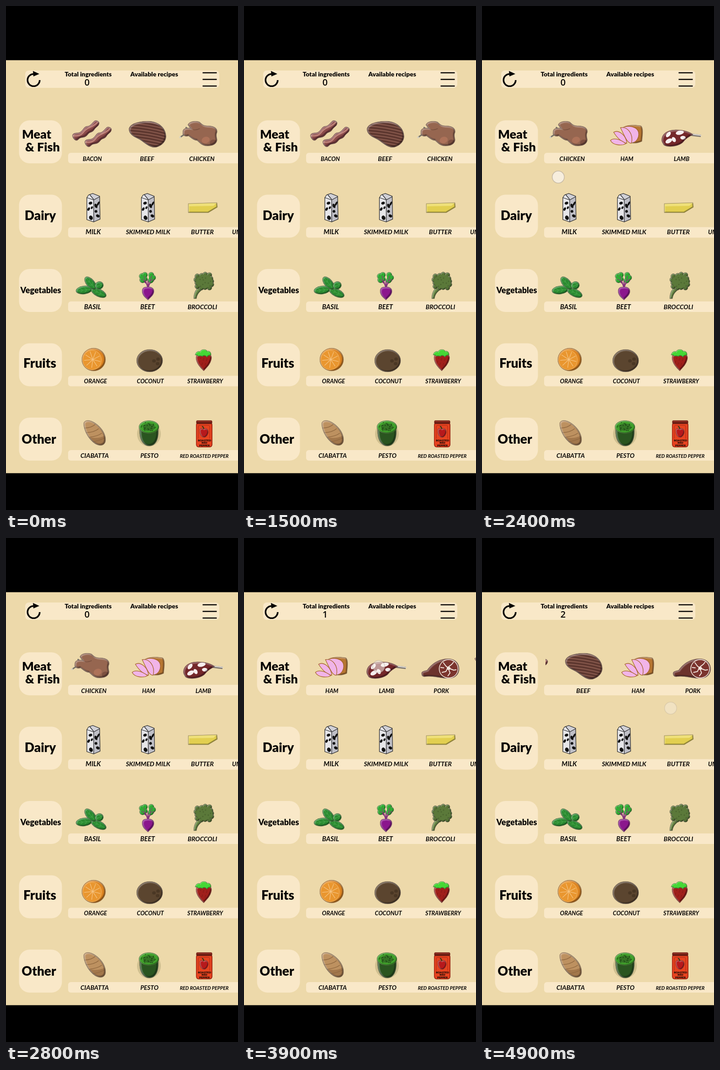
An HTML page with a canvas that plays this animation: 508x1102 px, repeating every 5000 ms.

```html
<!DOCTYPE html>
<html lang="en">
<head>
<meta charset="utf-8">
<title>Pick ingredients</title>
<style>
html, body { margin: 0; width: 100%; height: 100%; overflow: hidden; background: #000; }
canvas { display: block; width: 508px; height: 1102px; }
</style>
</head>
<body>
<canvas id="stage" width="508" height="1102"></canvas>
<script>
const c = document.getElementById('stage').getContext('2d');
const LOOP = 5000, STEP = 100;
const BG = '#edd9aa', PANEL = '#f9e8c8';

// ---------- helpers ----------
function fill(d, color) {
  c.fillStyle = color;
  c.fill(new Path2D(d));
}
function line(d, color, w = 1) {
  c.strokeStyle = color;
  c.lineWidth = w;
  c.stroke(new Path2D(d));
}
function oval(x, y, rx, ry = rx, rot = 0) {
  const p = new Path2D();
  p.ellipse(x, y, rx, ry, rot, 0, Math.PI * 2);
  return p;
}
function dot(color, ...args) {
  c.fillStyle = color;
  c.fill(oval(...args));
}
function box(x, y, w, h, r, color) {
  c.fillStyle = color;
  c.beginPath();
  c.roundRect(x, y, w, h, r);
  c.fill();
}
function inside(p, draw) {
  c.save();
  c.clip(p);
  draw();
  c.restore();
}
// Raised look: lit upper left rim, shaded lower right rim
function raise(shape, color, rim = 1, detail) {
  const p = typeof shape === 'string' ? new Path2D(shape) : shape;
  c.fillStyle = color;
  c.fill(p);
  inside(p, () => {
    if (detail) detail();
    for (const [shift, tint] of [[-1, 'rgba(0,0,0,.22)'], [1, 'rgba(255,255,255,.17)']]) {
      c.save();
      c.translate(shift * rim, shift * rim);
      c.strokeStyle = tint;
      for (const w of [2, 4.5]) { c.lineWidth = w * rim; c.stroke(p); }
      c.restore();
    }
  });
  c.strokeStyle = 'rgba(40,15,5,.3)';
  c.lineWidth = 0.8;
  c.stroke(p);
}
function text(s, x, y, font, align = 'center') {
  c.font = font;
  c.textAlign = align;
  c.fillStyle = '#080604';
  c.fillText(s, x, y);
}
const heavy = size => `900 ${size}px Lato, sans-serif`;
const hand = size => `italic 700 ${size}px Lato, sans-serif`;

// Linear keys: [time, ...values]; null outside their span
function track(keys, t) {
  for (let i = 0; i < keys.length - 1; i++) {
    const a = keys[i], b = keys[i + 1];
    if (t >= a[0] && t <= b[0]) {
      const k = (t - a[0]) / (b[0] - a[0]);
      return a.slice(1).map((v, j) => v + (b[j + 1] - v) * k);
    }
  }
  return null;
}

// ---------- meat & fish ----------
function bacon() {
  const strip = 'M146 281C150 276 156 279 162 276C169 272 170 264 177 263C185 263 189 255 194 251C199 249 205 253 204 257C203 263 196 265 193 271C189 277 184 275 180 280C175 287 171 287 165 288C159 289 158 295 153 294C148 292 144 285 146 281Z';
  for (const [dx, dy] of [[0, 0], [27, 14]]) {
    c.save();
    c.translate(dx, dy);
    raise(strip, '#8a4a4a', 1, () => {
      line('M146 284C158 284 164 284 171 274S188 268 203 252', '#bf847b', 3);
      line('M150 292C160 285 168 287 176 279S190 270 203 260', '#6f3739', 2);
    });
    c.restore();
  }
}
function beef() {
  raise('M269 268C272 257 290 252 312 252C336 253 350 268 350 286C349 301 333 310 322 309C308 306 300 295 287 289C277 285 268 278 269 268Z', '#5d372f', 1.2, () => {
    for (let i = 0; i < 11; i++) {
      const y = 236 + i * 6.5;
      line(`M264 ${y}Q310 ${y + 2} 354 ${y + 15}`, '#85574b', 2.6);
    }
  });
}
function chicken() {
  line('M381 287L390 281M393 265L399 270', '#777369', 3);
  dot('#d5d0c2', 381, 287, 2);
  raise('M398 260C400 252 416 250 424 254C429 259 433 262 440 262C452 262 463 265 462 276C459 282 461 286 462 293C460 304 449 306 440 306C429 306 424 299 418 294C411 294 405 288 399 284C392 287 385 282 387 276C386 268 394 266 403 267Z', '#966650', 1.2, () => {
    dot('#ad7259', 437, 293, 9, 7, -.3);
    dot('#7d5040', 454, 299, 8, 7);
    line('M403 267Q412 274 424 268', '#79503f', 1.5);
  });
}
function ham() {
  const rind = '#a8682f';
  raise('M309 265C320 259 337 260 348 262C354 267 351 285 350 296C341 300 334 301 325 299Z', '#b77632');
  fill('M306 267C322 260 343 265 343 281C343 290 337 298 326 299Z', '#f1b4e8');
  const slices = [
    'M303 266C318 263 332 279 327 300C318 301 312 284 303 266Z',
    'M288 276C299 270 315 282 317 300C305 298 295 287 288 276Z',
    'M281 294C287 288 301 290 315 301C306 306 287 305 281 294Z'
  ];
  for (const d of slices) {
    fill(d, '#f1b4e8');
    line(d, rind, 1.3);
  }
  line('M312 264C330 260 344 267 343 281C343 289 338 296 332 299', rind, 1.5);
}
function lamb() {
  line('M454 281L479 284', '#77716c', 5);
  line('M456 280L480 283', '#d6d2cc', 2.5);
  raise('M394 297C391 283 402 272 421 271C440 270 454 275 462 281C453 286 446 290 441 297C433 306 409 311 398 304Z', '#74272a', 1.2, () => {
    dot('#f6eeee', 408, 281, 4, 7, .7);
    dot('#f6eeee', 409, 295, 8, 4.5, -.5);
    dot('#f6eeee', 433, 277, 9, 4.5, -.2);
    dot('#f6eeee', 420, 292, 4, 6, -.5);
    dot('#f6eeee', 440, 288, 6, 4);
  });
}
function pork() {
  raise('M390 298C388 291 396 291 402 289C411 276 425 265 447 264C463 264 472 273 472 287C471 302 459 308 445 307C425 305 412 301 398 303C393 304 390 301 390 298Z', '#6c332d', 1.2);
  dot('#f0e2d8', 449, 286, 21.5, 21);
  dot('#7b342e', 449, 286, 19.8, 19.3);
  line('M437 272L443 280L447 283L456 276L460 271M447 284L443 292L434 294M450 285L460 289L466 288M449 287L452 295L447 302M431 283L439 284', '#f3e7df', 1.9);
  dot('#f3e7df', 449, 285, 4, 3.3);
}
function sausage() {
  raise('M428 264C429 260 435 262 439 263C453 277 484 284 524 285V300C484 299 444 293 428 264Z', '#a06b58', 1.2);
}
// name -> [drawing, x it is drawn around, label size]
const MEAT = {
  BACON: [bacon, 189, 12.7], BEEF: [beef, 308.5, 14], CHICKEN: [chicken, 428.5, 13.4],
  HAM: [ham, 317, 12.7], LAMB: [lamb, 437, 13], PORK: [pork, 433, 13], SAUSAGE: [sausage, 475, 12.8]
};
function meat(name, x) {
  const [draw, home, size] = MEAT[name];
  c.save();
  c.translate(x - home, 0);
  draw();
  text(name, home, 339, hand(size));
  c.restore();
}

// ---------- fixed rows ----------
function milk() {
  fill('M177 419L181 413L190 410L205 416L206 466L192 472L177 467Z', '#e6e6e9');
  fill('M192 424L205 417L206 466L192 472Z', '#bfbfc6');
  fill('M181 413L190 410L205 416L192 424L185 417Z', '#d0d0d6');
  const spots = [[185, 431, 4, 3], [181, 444, 2.5, 4], [186, 463, 4, 5], [188, 441, 2, 3],
    [197, 437, 3, 5], [202, 432, 2, 5], [197, 449, 3, 3], [201, 459, 4, 3]];
  spots.forEach(([x, y, a, b], i) => dot('#111', x, y, a, b, i % 2 ? .5 : -.4));
  line('M177 419L181 413L190 410L205 416L206 466L192 472L177 467ZM177 419L192 424L205 417M192 424V472M183 412L192 423', '#2c2c2e', 1.3);
}
function butter() {
  raise('M399 432L462 430L463 440L443 452L399 452Z', '#e2cf50', .8);
  fill('M401 433L461 431L454 437L401 438Z', '#efe079');
}
function basil() {
  const leaf = (x, y, rx, ry, rot) => raise(oval(x, y, rx, ry, rot), '#2a8a30', 1, () => {
    c.save();
    c.translate(x, y);
    c.rotate(rot);
    line(`M${-rx} 0H${rx}M-8 -4L-3 0L-8 4M1 -5L6 0L1 5`, '#47a54a', 1);
    c.restore();
  });
  leaf(171, 621, 18, 9, -.12);
  leaf(203, 627, 18, 8.5, .45);
  leaf(185, 606, 17, 9, .85);
  leaf(204, 611, 9.5, 8.5, -.4);
}
function beet() {
  line('M311 616L304 597M311 616L319 594M311 616V598M308 607L299 600M313 608L324 600', '#85337c', 2.4);
  const blobs = [[298, 591, 6.5], [304, 588, 6], [299, 599, 6.5], [305, 597, 5], [318, 588, 6], [322, 594, 6], [317, 600, 6]];
  for (const [x, y, r] of blobs) raise(oval(x, y, r), '#30ac33', .7);
  dot('#30ac33', 301, 594, 6);
  dot('#30ac33', 319, 594, 6);
  line('M302 590L308 609M319 590L314 609M297 597L305 602M324 597L315 602', '#8b3a79', 1.3);
  raise('M298 623C299 613 306 615 311 614C317 614 325 616 324 625C323 633 316 637 311 643C304 637 298 632 298 623Z', '#8b168d', 1.2);
}
function broccoli() {
  raise('M430 607L439 613C428 622 419 626 417 640L411 640C411 630 414 622 420 616Z', '#6c8a48', .8);
  for (let i = 0; i < 13; i++) {
    const a = i * Math.PI * 2 / 13, r = 1 + .12 * (i % 3 - 1);
    raise(oval(434 + 18 * r * Math.cos(a), 602 + 15 * r * Math.sin(a), 5.5), '#557236', .8);
  }
  dot('#5b793a', 434, 602, 18, 15);
  for (let i = 0; i < 12; i++) dot('#4b652f', 421 + i * 11 % 28, 592 + i * 7 % 25, 1.4);
}
function orange() {
  raise(oval(192, 773, 26, 25), '#dd8522', 1.2);
  dot('#f2b05a', 188.5, 774, 21, 22);
  dot('#e9962f', 188.5, 774, 19.8, 20.8);
  for (let i = 0; i < 9; i++) {
    const a = i * Math.PI * 2 / 9 + .25;
    line(`M190 773L${189 + 18 * Math.cos(a)} ${773 + 18 * Math.sin(a)}`, '#f6c585', 1.2);
  }
}
function coconut() {
  raise(oval(314.5, 775.5, 28.5, 24.5), '#5b452f', 1.1);
  for (const [x, y] of [[324, 776], [333, 772], [332, 782]]) dot('#4a3724', x, y, 4, 3.5);
}
function strawberry() {
  raise('M416 770C415 760 428 759 433 761C440 759 452 761 450 771C448 783 440 790 433 798C425 790 417 782 416 770Z', '#a01f1b', 1.1, () => {
    for (let i = 0; i < 18; i++) dot('#7c1815', 419 + i * 13 % 29, 769 + i * 5 % 24, 1);
  });
  raise('M414 763C416 755 423 754 425 756C427 750 438 749 441 755C446 753 450 758 449 764C444 763 442 766 440 768C437 764 433 764 430 767C426 763 422 769 419 764Z', '#45d835', .6);
}
function ciabatta() {
  raise('M170 914C170 905 182 904 192 910C208 919 219 935 218 950C217 963 203 964 191 954C179 944 171 928 170 914Z', '#bd9160', 1.2, () => {
    fill('M176 940Q196 950 220 938L220 970H180Z', 'rgba(100,62,28,.3)');
    for (let i = 0; i < 4; i++) line(`M${168 + i * 7} ${923 + i * 10}Q${188 + i * 6} ${923 + i * 9} ${196 + i * 7} ${914 + i * 10}`, '#8f673f', 1.4);
  });
}
function pesto() {
  dot('#d0c090', 313, 936, 26, 27);
  raise('M293 921C290 950 302 962 314 962C327 962 336 948 333 921Z', '#2a5520', 1.4);
  raise(oval(313, 920.5, 22, 14), '#41a02c', .8);
  dot('#357425', 313, 921, 13, 8);
  for (let i = 0; i < 26; i++) {
    const a = i * 2.4, r = .3 + .6 * (i * 7 % 10) / 10;
    dot('#173d12', 313 + 20 * r * Math.cos(a), 920 + 12 * r * Math.sin(a), 1);
  }
}
function pepperJar() {
  box(416, 910, 36, 55, 6, '#9b2615');
  box(417.3, 912, 33, 51.5, 5, '#e6431f');
  box(416.5, 906, 35, 8, 3, '#6d1d13');
  box(418, 907, 32, 2, 1, '#97392b');
  line('M421 946V920Q421 917 424 917H443Q446 917 446 920V946', '#a92b18', 1);
  raise('M424 929C424 922 430 923 433 925C438 921 444 926 443 933C441 941 436 944 433 943C428 943 424 936 424 929Z', '#b7191c', .8);
  line('M433 925Q433 920 429 919', '#2d3b18', 2.2);
  ['ROASTED', 'RED', 'PEPPER'].forEach((s, i) =>
    text(s, 434.5, 951.5 + i * 5.7, heavy(6.2)));
}

const LABELS = [
  ['MILK', 191, 494, 14.6], ['SKIMMED MILK', 311, 494, 14], ['BUTTER', 430, 494, 14],
  ['BASIL', 189.5, 658, 14.6], ['BEET', 310, 658, 14.2], ['BROCCOLI', 430, 658, 13.8],
  ['ORANGE', 196, 820, 12.8], ['COCONUT', 316, 820, 12.6], ['STRAWBERRY', 436, 820, 12.7],
  ['CIABATTA', 194, 983, 14], ['PESTO', 314, 983, 13.6], ['RED ROASTED PEPPER', 434, 983, 10.7]
];
const TITLES = [
  ['Meat', 67, 290, 27], ['& Fish', 80, 318, 27], ['Dairy', 75, 468, 28], ['Vegetables', 76, 628, 18],
  ['Fruits', 74, 791, 28], ['Other', 72, 957, 28],
  ['Total ingredients', 180, 154, 13.7], ['Available recipes', 324.5, 154, 13.8]
];

function scenery() {
  c.fillStyle = '#000';
  c.fillRect(0, 0, 508, 1102);
  c.fillStyle = BG;
  c.fillRect(0, 118.5, 508, 903);
  box(42, 141, 425, 38, 8, PANEL);
  for (let i = 0; i < 5; i++) {
    const y = 250 + i * 162.5;
    box(28.5, y, 94, 94, 23, PANEL);
    box(136, y + 71, 400, 23, 6, PANEL);
  }
  // reload and menu buttons
  c.beginPath();
  c.arc(60.5, 162, 13.3, 0, Math.PI * 1.58);
  c.strokeStyle = '#080604';
  c.lineWidth = 3.6;
  c.stroke();
  fill('M59 142L73 148.5L60 154Z', '#080604');
  line('M430.5 146H461.5M430.5 160.5H461.5M430.5 175H461.5', '#080604', 2.3);

  for (const [s, x, y, size] of TITLES) text(s, x, y, heavy(size));
  for (const [s, x, y, size] of LABELS) text(s, x, y + 5, hand(size));
  text('UNSALTED BUTTER', 495, 499, hand(13.4), 'left');

  milk();
  c.save();
  c.translate(119.5, 0);
  milk();
  c.restore();
  [butter, basil, beet, broccoli, orange, coconut, strawberry, ciabatta, pesto, pepperJar].forEach(f => f());
}

// ---------- motion ----------
const SCROLL = [[0, 0], [1600, 0], [1700, -8], [1900, -72], [2100, -150], [2300, -217], [2400, -231.5],
  [2500, -236.5], [4300, -236.5], [4400, -220], [4500, -193.5], [4700, -133], [4900, -87], [5000, -75]];
// time, x, y, strength
const TOUCHES = [
  [[1600, 402, 366, .6], [1700, 394, 367, .8], [2300, 181, 374, .8], [2400, 167, 374, .75], [2500, 163, 374, .3]],
  [[2900, 206, 281, .5], [3000, 207, 281, .6], [3100, 207, 281, .25]],
  [[3800, 295, 281, .5], [3900, 295, 281, .55], [4000, 295, 281, .2]],
  [[4300, 300, 322, .6], [4500, 333, 341, .8], [4800, 405, 368, .7], [4900, 413, 372, .35]]
];
const PICKS = [['CHICKEN', 3100, 192.5], ['LAMB', 4000, 312.5]];

// A picked item shrinks upward towards the header
function flight(name, start, x, t) {
  const f = track([[start, 20, 265, .83, 1], [start + 100, 28, 232, .62, .6], [start + 200, 32, 212, .45, .2]], t);
  if (!f) return;
  const [dx, y, scale, alpha] = f;
  c.save();
  c.globalAlpha = alpha;
  c.translate(x + dx, y);
  c.scale(scale, scale);
  c.translate(0, -334);
  meat(name, 0);
  c.restore();
}
function touch(keys, t) {
  const p = track(keys, t);
  if (!p) return;
  const [x, y, k] = p;
  dot(`rgba(250,244,238,${k})`, x, y, 13);
  c.strokeStyle = `rgba(175,165,155,${k * .8})`;
  c.lineWidth = 1.6;
  c.stroke(oval(x, y, 13.2));
}

function draw(t) {
  scenery();
  const taken = PICKS.filter(p => t >= p[1]);
  text(String(taken.length), 177.5, 174, '600 20px "Open Sans", sans-serif');

  const shift = track(SCROLL, t)[0];
  const gone = taken.map(p => p[0]);
  c.save();
  c.beginPath();
  c.rect(139, 200, 369, 150);
  c.clip();
  Object.keys(MEAT).filter(n => !gone.includes(n)).forEach((name, i) => {
    const x = 189 + i * 119.9 + shift;
    if (x > 40 && x < 620) meat(name, x);
  });
  c.restore();

  for (const p of PICKS) flight(...p, t);
  for (const keys of TOUCHES) touch(keys, t);
}

let shown = -1;
const began = performance.now();
function tick() {
  const t = Math.floor((performance.now() - began) % LOOP / STEP) * STEP;
  if (t !== shown) draw(shown = t);
  requestAnimationFrame(tick);
}
draw(shown = 0);
requestAnimationFrame(tick);
</script>
</body>
</html>
```
